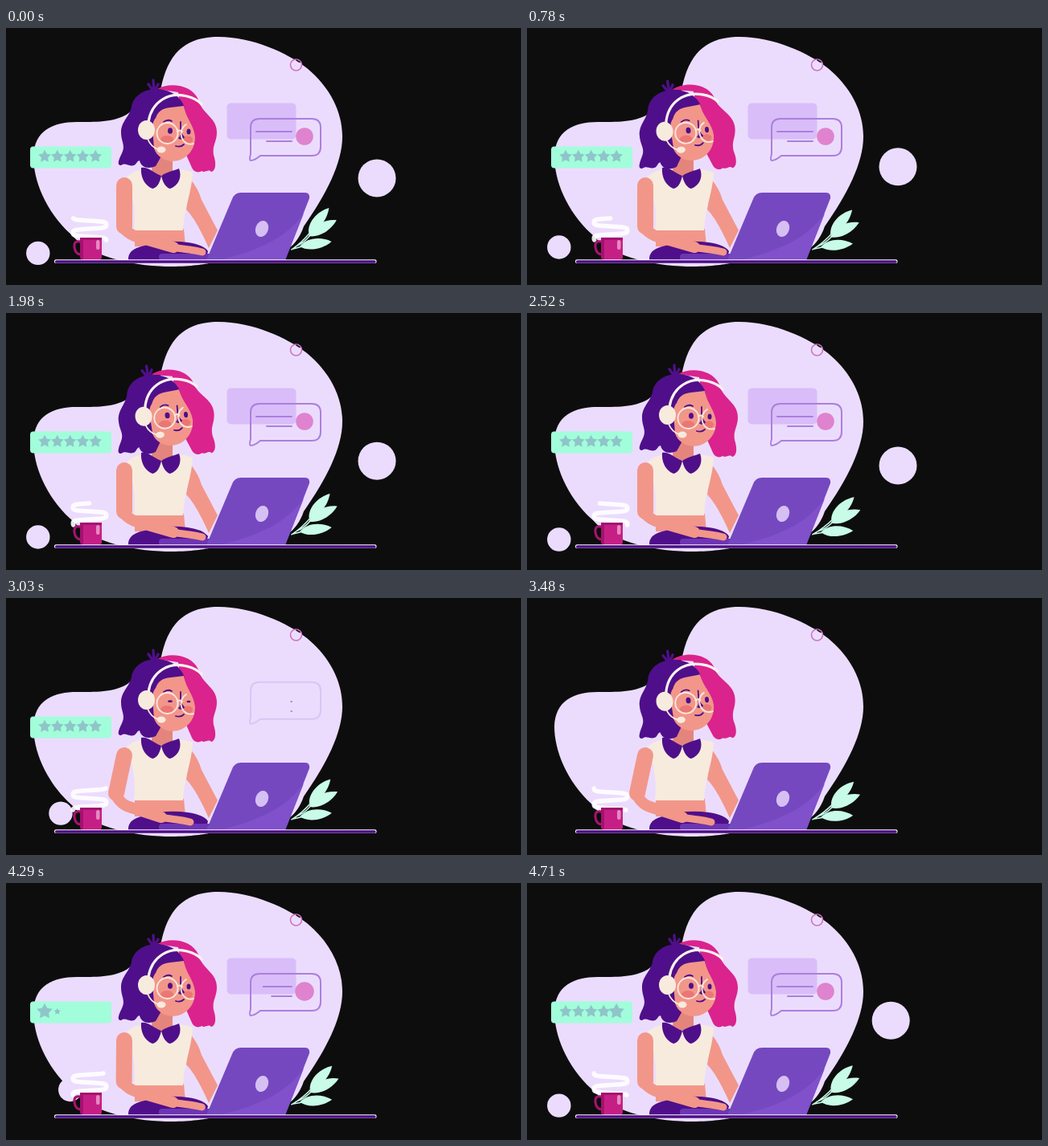
Recreate the animation shown at these times as an HTML page. Size 640 by 320 pixels, loop 4740 ms.

```html
<!DOCTYPE html>
<html lang="en">
<head>
<meta charset="utf-8">
<title>Support agent</title>
<style>
  html, body { margin: 0; width: 100%; height: 100%; overflow: hidden; background: #0d0d0d; }
  svg { display: block; width: 100vw; height: 100vh; }
  .lilac { fill: #ebdcfd; }
  .purple { fill: #4f0f8a; }
  .skin { fill: #f2968a; }
  .cream { fill: #f7ebde; }
  .line { fill: none; stroke-linecap: round; stroke-linejoin: round; }
</style>
</head>
<body>
<svg viewBox="0 0 640 320">
  <defs><path id="leaf" d="M0 0C9 -9 27 -9 40 0C27 8 9 8 0 0Z"/></defs>

  <g class="lilac">
    <circle id="ballLeft" r="14.7"/>
    <circle id="ballRight" r="23.5"/>
    <path d="M192 78C201 28 226 11 264 11C306 11 350 31 374 50C402 73 418 104 418 135C418 168 398 207 370 247C360 276 340 288 290 288C260 288 258 296 206 297C166 297 108 288 82 258C50 230 34 190 34 160C35 128 58 117 88 117C112 117 140 118 156 103C176 100 190 88 192 78Z"/>
    <circle cx="360.5" cy="46" r="7" stroke="#cc75c2" stroke-width="1.6"/>
  </g>
  <path class="line" d="M361 40L365 42.5" stroke="#26102e" stroke-width="1.6"/>

  <rect id="panel" x="274.5" y="93.5" width="86" height="45" rx="5" fill="#d9bdf9"/>
  <path id="bubble" class="line" stroke="#ac7fdd" stroke-width="2"
    d="M315 113H380Q391 113 391 124V148Q391 159 380 159H316Q309 165 304 165Q302 164 304 157V124Q304 113 315 113Z"/>
  <path id="lines" class="line" stroke="#ac7fdd" stroke-width="2"/>
  <circle id="dot" r="10.8" fill="#df83cf"/>

  <rect id="badge" x="-50.5" y="-13.5" width="101" height="27" rx="4" fill="#a2fddb"/>
  <g id="stars" fill="#8fc5c8"></g>

  <path id="smoke" class="line" stroke="#fff" stroke-width="5.5" opacity=".9"/>
  <path class="line" d="M93 266Q84 264 85 273Q86 282 94 282" stroke="#a81270" stroke-width="3"/>
  <path d="M92 261H119V285Q119 289 115 289H97Q92 289 92 284Z" fill="#c51f86"/>
  <path d="M92 261H119V264H96V289Q92 288 92 284Z" fill="#a4116f"/>
  <rect x="112" y="264" width="4.5" height="12" rx="2.2" fill="#e68abf"/>

  <g id="leaves" fill="#c8fbe8">
    <path class="line" d="M355 276Q368 267 379 253M360 272Q370 268 378 258M357 275L368 272" stroke="#c8fbe8" stroke-width="1.5"/>
    <use href="#leaf" transform="translate(376 255) rotate(-51)"/>
    <use href="#leaf" transform="translate(376 259) rotate(-30)"/>
    <use href="#leaf" transform="translate(365 272) rotate(-9)"/>
  </g>

  <path class="skin" d="M229 188Q239 200 243 214L263 252L252 274Q236 238 224 226Z"/>
  <path class="skin" d="M160 250H221L223 272H160Z"/>
  <path class="purple" d="M152 289Q151 275 172 271Q198 263 226 267Q246 270 251 278L248 289Z"/>
  <path fill="#e4857d" d="M183 155H207V178L192 188L181 178Z"/>
  <path class="cream" d="M150 185Q160 177 170 176L192 184L214 176Q226 177 232 180C231 205 221 224 220 252H159C162 232 158 206 150 185Z"/>
  <path class="purple" d="M168 174C175 172 182 179 193 184C191 194 187 199 182 200C172 196 167 185 168 174ZM215 175C208 178 200 179 193 184C195 193 199 199 204 200C215 196 219 185 215 175Z"/>

  <g id="head">
    <path class="line" d="M184 80L177 70M184 80L183 65M184 80L189 70" stroke="#4f0f8a" stroke-width="3.4"/>
    <path fill="#da238d" d="M188 76C204 67 231 71 239 89C243 107 262 111 262 130C262 142 256 146 258 158C262 170 260 178 255 179C251 175 248 181 243 178C239 181 233 179 231 174L224 158L214 80Z"/>
    <path class="purple" d="M190 76C171 75 158 85 156 98C154 110 143 116 143 130C143 142 149 146 144 156C139 166 138 171 143 171C149 167 152 173 159 171C163 169 162 166 166 165C168 174 177 176 186 172L204 140L222 99Q215 79 190 76Z"/>
    <path class="skin" d="M186 112Q190 100 204 99L221 97C223 112 234 121 235 136C235 150 227 161 214 165C201 168 188 162 184 150L182 125Q182 116 186 112Z"/>
    <g fill="#e9706f" opacity=".8"><ellipse cx="200" cy="139" rx="8" ry="5"/><ellipse cx="226" cy="139" rx="6" ry="4.5"/></g>
    <g id="eyes" class="purple"><ellipse cx="204" cy="128" rx="3" ry="3.8"/><ellipse cx="227" cy="129" rx="2.5" ry="3.6"/></g>
    <g class="line" stroke="#4f0f8a" stroke-width="1.8">
      <path d="M196 117Q201 113 206 116M217 117V128M211 147Q217 149 221 145"/>
      <path d="M217 131L221 136Q218 139 215 137" fill="#4f0f8a"/>
    </g>
    <g class="line" stroke="#fbe7dc" stroke-width="1.9">
      <circle cx="200.5" cy="131" r="13"/>
      <path d="M213 129Q216 126 219 129M233 144A12 13 0 0 1 224 120"/>
    </g>
    <path class="line" d="M177 117C181 91 203 79 225 85Q237 88 243 95" stroke="#fcf2f0" stroke-width="3.2"/>
    <path class="line" d="M176 138Q180 148 189 151" stroke="#fbeee0" stroke-width="1.8"/>
    <ellipse class="cream" cx="174.5" cy="127" rx="10.5" ry="12"/>
    <ellipse class="cream" cx="193" cy="151.5" rx="5.5" ry="4"/>
  </g>

  <rect x="190" y="281" width="66" height="8.5" rx="4" fill="#6d35b4"/>
  <g class="line" stroke="#f2968a">
    <path id="upperArm" stroke-width="20"/>
    <path id="forearm" stroke-width="14"/>
    <path id="hand" stroke-width="9"/>
  </g>
  <path fill="#7548c0" d="M249 289L281 213Q284 205 292 205H371Q378 205 377 212L347 289Z"/>
  <path fill="#8051ca" d="M264 289C314 278 350 260 370 231L347 289Z"/>
  <ellipse cx="318" cy="250" rx="7.8" ry="10.3" transform="rotate(20 318 250)" fill="#d6bff2"/>
  <rect x="60" y="288.3" width="400.5" height="4.7" rx="2" fill="#fff"/>
  <rect x="61" y="289.2" width="398.5" height="3.5" rx="1.5" fill="#4d0d86"/>
</svg>
<script>
const LOOP = 4740, TAU = 2 * Math.PI;
const $ = id => document.getElementById(id);
const set = (id, name, value) => $(id).setAttribute(name, value);
const place = (el, x, y, sx = 1, sy = sx) =>
  el.setAttribute('transform', `translate(${x} ${y}) scale(${sx} ${sy})`);

const progress = (t, from, to) => Math.min(1, Math.max(0, (t - from) / (to - from)));
const ramp = (t, from, to) => {
  const p = progress(t, from, to);
  return p * p * (3 - 2 * p);
};
// Rises to 1 after `on`, falls back to 0 after `off`.
const pulse = (t, on, off, rise, fall = rise) => ramp(t, on, on + rise) - ramp(t, off, off + fall);
// Grows from 0 to 1 and overshoots on the way.
const pop = (t, start, duration, overshoot) => {
  const q = progress(t, start, start + duration) - 1;
  return 1 + (overshoot + 1) * q ** 3 + overshoot * q ** 2;
};

const starPath = Array.from({ length: 10 }, (_, i) => {
  const r = i % 2 ? 4.3 : 8.2, a = i * TAU / 10;
  return `${r * Math.sin(a)} ${-r * Math.cos(a)}`;
}).join('L');
$('stars').innerHTML = `<path d="M${starPath}Z"/>`.repeat(5);
const stars = [...$('stars').children];

function smokePath(t) {
  const points = [];
  for (let y = 237; y <= 264; y += 0.25) {
    const wave = Math.tanh(2.5 * Math.sin(TAU * (y / 20 + t / 1200)));
    points.push(`${(104 + 21 * wave).toFixed(1)} ${y}`);
  }
  return 'M' + points.join('L');
}

function drawBalls(t) {
  const bob = Math.cos(TAU * (t - 2520) / 2900);
  const leftAway = pulse(t, 2800, 4100, 460, 540);
  const rightAway = pulse(t, 2560, 4150, 400, 700);
  place($('ballLeft'), 39.8 + 56 * leftAway, 277 + 5 * bob - 22 * leftAway);
  place($('ballRight'), 461 - 86 * rightAway, 180.5 + 9.5 * bob - 30 * Math.sqrt(rightAway));
}

function drawAgent(t) {
  const tilt = pulse(t, 210, 1995, 240) + pulse(t, 3070, 4050, 240);
  set('head', 'transform', `rotate(${-4.5 * tilt} 195 172)`);

  const shut = Math.exp(-(((t - 1400) / 60) ** 2)) + Math.exp(-(((t - 3030) / 60) ** 2));
  const open = 1 - 0.65 * shut;
  place($('eyes'), 0, 129 * (1 - open), 1, open);

  const reach = pulse(t, 2700, 4080, 240);
  const elbowX = 147 - 10 * reach, elbowY = 247 - 4 * reach, handX = 220 - 15 * reach;
  set('upperArm', 'd', `M147 196L${elbowX} ${elbowY}`);
  set('forearm', 'd', `M${elbowX} ${elbowY + 3}Q${elbowX + 6} 257 ${elbowX + 16} 260L${handX - 12} 273`);
  set('hand', 'd', `M${handX - 14} 273Q${handX} 275 ${handX + 8} 276T${handX + 24} 279`);
}

function drawChat(t) {
  const panelAway = pulse(t, 2760, 3420, 240, 680);
  place($('panel'), 28 * panelAway, 8 * panelAway);
  set('panel', 'opacity', Math.min(1, 1.2 * (1 - panelAway)));

  const bubbleAway = pulse(t, 2830, 3480, 300, 580);
  place($('bubble'), 0, -11 * bubbleAway);
  set('bubble', 'opacity', 1 - bubbleAway);

  const written = 1 - pulse(t, 2780, 4020, 270, 380);
  set('lines', 'd', `M355 129H${355 - 44 * written}M355 141H${355 - 31 * written}`);
  set('lines', 'opacity', Math.min(1, 80 * written));
  place($('dot'), 371, 135, 1 - ramp(t, 2760, 2960) + pop(t, 4080, 320, 1.7));
}

function drawRating(t) {
  const grow = 1 - ramp(t, 3090, 3300) + pop(t, 3680, 440, 1.7);
  place($('badge'), 80.5, 161, grow, Math.min(grow, 1.03));
  stars.forEach((star, i) => {
    const size = 1 - ramp(t, 3060, 3240) + pop(t, 4160 + 105 * i, 260, 3);
    place(star, 48 + 15.8 * i, 160, size);
  });
}

function drawPlantAndSmoke(t) {
  const sway = 4.2 - 4 * Math.cos(TAU * t / 990) * (1 - t / 6000);
  set('leaves', 'transform', `rotate(${sway} 357 275)`);
  set('smoke', 'd', smokePath(t));
}

function frame(now) {
  const t = now % LOOP;
  for (const part of [drawBalls, drawAgent, drawChat, drawRating, drawPlantAndSmoke]) part(t);
  requestAnimationFrame(frame);
}
requestAnimationFrame(frame);
</script>
</body>
</html>
```
